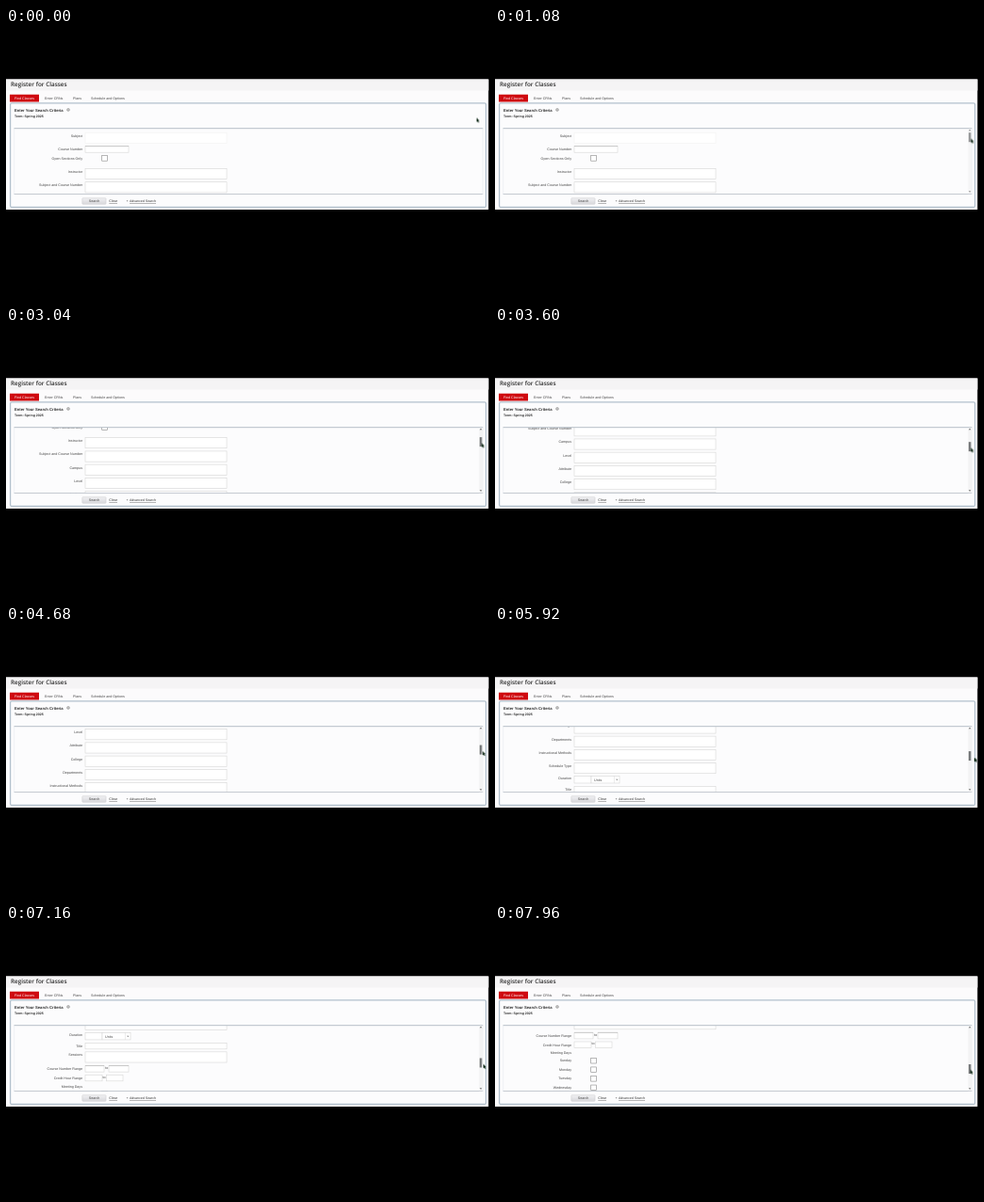
Animation of 512 by 288 pixels, one loop 8000 ms. Source, as an HTML page:

```html
<!DOCTYPE html>
<html lang="en">
<head>
<meta charset="utf-8">
<title>Register for Classes</title>
<style>
@property --scroll { syntax: "<number>"; inherits: true; initial-value: 0; }
html, body { margin: 0; width: 100%; height: 100%; overflow: hidden; background: #000; }
svg { display: block; width: 100%; height: 100%; animation: scroll 8s linear infinite; }
text { font: 3.65px "Liberation Sans", Arial, sans-serif; fill: #444; text-rendering: geometricPrecision; }
.title { font: 600 6.35px "Open Sans", "Noto Sans", sans-serif; fill: #2c2c2c; }
.bold { font-weight: bold; fill: #2c2c2c; }
.label { text-anchor: end; }
.link { text-decoration: underline; fill: #333; }
.field { fill: #fff; stroke: #d6d6d6; stroke-width: .6; }
.box { fill: #fff; stroke: #888; stroke-width: .6; }
.content { transform: translateY(calc(var(--scroll) * -1px)); }
.thumb { transform: translateY(calc(var(--scroll) * .186px)); }
.bar { animation: bar 8s linear infinite; }
.first { animation: first 8s step-end infinite; }
.cursor { animation: cursor 8s linear infinite; }
@keyframes scroll {
  0%, 26.5% { --scroll: 0; }
  28.5% { --scroll: 4; }
  31.5%, 33.5% { --scroll: 12; }
  44% { --scroll: 58; }
  45%, 47% { --scroll: 59; }
  54%, 56% { --scroll: 78; }
  58.5%, 59.5% { --scroll: 82.5; }
  66.5%, 68.5% { --scroll: 104; }
  70%, 72% { --scroll: 110; }
  74%, 76.5% { --scroll: 117.7; }
  81% { --scroll: 135.6; }
  85.5%, 87% { --scroll: 152; }
  94%, 96% { --scroll: 182; }
  99.5%, 100% { --scroll: 198; }
}
@keyframes bar { 0%, 10.5% { opacity: 0; } 14.5%, 100% { opacity: 1; } }
@keyframes first { 0% { stroke: #f2f2f2; } 26.5% { stroke: #d6d6d6; } }
@keyframes cursor {
  0%, .5% { transform: translate(498.8px, 95.4px); }
  6% { transform: translate(503.5px, 120px); }
  10.5%, 19% { transform: translate(504.5px, 117.5px); }
  19.5%, 21.5% { transform: translate(504.2px, 117.3px); }
  23%, 26.5% { transform: translate(503.8px, 117.3px); }
  28.5% { transform: translate(503.8px, 118px); }
  31.5%, 33.5% { transform: translate(504px, 119.5px); }
  44%, 47% { transform: translate(504.4px, 128.3px); }
  54%, 56% { transform: translate(505.2px, 132px); }
  58.5%, 59.5% { transform: translate(505.3px, 133px); }
  66.5%, 68.5% { transform: translate(508px, 137px); }
  74%, 76.5% { transform: translate(508.4px, 139.8px); }
  81% { transform: translate(507.2px, 143.2px); }
  85.5%, 87% { transform: translate(506.5px, 146px); }
  94%, 96% { transform: translate(505px, 151px); }
  99.5%, 100% { transform: translate(503.8px, 153.6px); }
}
</style>
</head>
<body>
<svg viewBox="0 0 512 288">
  <defs>
    <clipPath id="view"><rect x="8" y="107" width="498" height="69.5"/></clipPath>
    <clipPath id="page"><rect y="54.5" width="511.4" height="138.6"/></clipPath>
    <linearGradient id="button" x2="0" y2="1">
      <stop stop-color="#f0f0f2"/><stop offset="1" stop-color="#d8d8dc"/>
    </linearGradient>
  </defs>
  <g clip-path="url(#page)">
    <rect y="54" width="512" height="140" fill="#fcfbfc"/>
    <rect y="54" width="512" height="12.5" fill="#f5f4f5"/>
    <text class="title" x="5" y="61.9">Register for Classes</text>
    <rect x="4" y="70.7" width="31" height="7.8" fill="#cf0a10"/>
    <text x="9" y="76.1" style="fill:#fff">Find Classes</text>
    <text x="41" y="76.1">Enter CRNs</text>
    <text x="71" y="76.1">Plans</text>
    <text x="90" y="76.1">Schedule and Options</text>

    <rect x="4.6" y="79.8" width="504.2" height="110.7" rx="1.5" fill="#fcfcfd" stroke="#b3c1cd" stroke-width="1.3"/>
    <text class="bold" x="9" y="88.5" style="font-size:4.16px">Enter Your Search Criteria</text>
    <circle cx="66" cy="86.9" r="1.5" fill="#ddd" stroke="#888" stroke-width=".5"/>
    <path d="M66 86.1v1.7" stroke="#666" stroke-width=".5"/>
    <text class="bold" x="9" y="95.4" style="font-size:3.55px">Term: Spring 2025</text>

    <g clip-path="url(#view)"><g class="content" id="form"></g></g>
    <path d="M8.5 106.7H505.5" stroke="#a4aeb9" stroke-width=".8"/>
    <path d="M8.5 176.5H505.5" stroke="#b8bec7" stroke-width=".8"/>
    <path d="M8.7 107V176.5M505.3 107V176.5" stroke="#e3e6ea" stroke-width=".5"/>

    <g class="bar">
      <rect x="501.5" y="107.2" width="3.8" height="69" fill="#f3f3f4"/>
      <path d="M502.2 109.2l1.1-1.5 1.1 1.5zM502.2 173.3l1.1 1.5 1.1-1.5z" fill="#555"/>
      <rect class="thumb" x="502.1" y="111.2" width="2.4" height="10" fill="#747678"/>
    </g>

    <rect x="80.8" y="180.7" width="25.2" height="6.6" rx=".8" fill="url(#button)" stroke="#cacace" stroke-width=".5"/>
    <text x="93.6" y="185.1" text-anchor="middle">Search</text>
    <text class="link" x="109.3" y="185.1">Clear</text>
    <text x="127.6" y="185.1">+</text>
    <text class="link" x="131" y="185.1" style="font-size:3.55px">Advanced Search</text>
    <path class="cursor" d="M0 0V4.6L1.1 3.7 1.9 5.3 2.7 4.9 1.9 3.3H3.2Z" fill="#17301f"/>
  </g>
</svg>
<script>
const form = document.getElementById("form");

function add(tag, attrs, text = "") {
  const node = document.createElementNS("http://www.w3.org/2000/svg", tag);
  for (const name in attrs) node.setAttribute(name, attrs[name]);
  node.textContent = text;
  form.append(node);
  return node;
}

const label = (text, y) => add("text", { class: "label", x: 81, y: y + 1.2 }, text);
const note = (text, x, y) => add("text", { x, y }, text);
const field = (x, y, width, height) => add("rect", { class: "field", x, y, width, height });

function area(text, y) {
  label(text, y);
  return field(84, y - 3.3, 150, 11.2);
}

function check(text, y) {
  label(text, y);
  add("rect", { class: "box", x: 101.7, y: y - 2.7, width: 5.6, height: 5.6 });
}

function input(x, y, width) {
  field(x, y, width, 6.6);
  add("path", { d: `M${x} ${y}h${width}`, stroke: "#aaa", "stroke-width": .5 });
}

area("Subject", 114.5).classList.add("first");
label("Course Number", 128.5);
input(84, 125.6, 46);
check("Open Sections Only", 138.3);
area("Instructor", 152.6);

["Subject and Course Number", "Campus", "Level", "Attribute", "College",
 "Departments", "Instructional Methods", "Schedule Type"]
  .forEach((name, i) => area(name, 167 + i * 14.22));

label("Duration", 279.7);
field(84, 277.3, 18, 7.4);
field(102, 277.3, 30, 7.4);
add("path", { d: "M126.4 277.3v7.4", stroke: "#d6d6d6", "stroke-width": .5 });
add("path", { d: "M128.2 280.4h2l-1 1.5z", fill: "#777" });
note("Units", 105, 282.4);

label("Title", 291.3);
field(84, 288.1, 150, 6.5);
area("Sessions", 300.9);

label("Course Number Range", 316);
input(84, 312.3, 20);
note("to", 105.2, 315.6);
input(109, 312.3, 21);
label("Credit Hour Range", 325.5);
field(84, 322, 18, 6.6);
note("to", 102.4, 325.4);
field(106.5, 322, 17.5, 6.6);
label("Meeting Days", 334.2);
["Sunday", "Monday", "Tuesday", "Wednesday", "Thursday"]
  .forEach((day, i) => check(day, 342.1 + i * 9.55));
</script>
</body>
</html>
```
